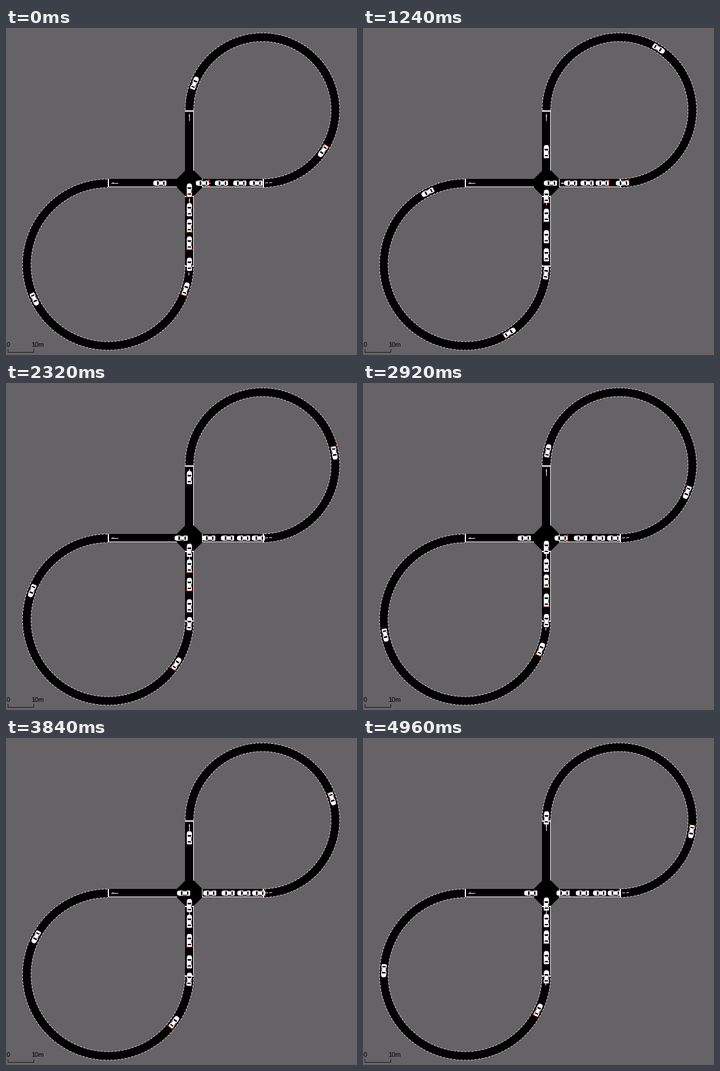
A matplotlib script that plays this animation: 600x559 px, repeating every 5 s.

```python
import numpy as np
import matplotlib.pyplot as plt
from matplotlib.animation import FuncAnimation
from matplotlib.collections import PolyCollection

W, H, DPI = 600, 559, 80
PX = 72 / DPI                      # one pixel in points
FRAMES, STEP = 125, 40
ROAD = 7.3                         # half width of the lane

# Figure-eight track: up, big clockwise turn, left, big counter-clockwise turn
UP_C, UP_R = (438.25, 140.5), 124.75
LOW_C, LOW_R = (174.5, 404.5), 139.0
X0, Y0 = 313.5, 265.2
S_UP = LOW_C[1] - UP_C[1]
S_LEFT = S_UP + 1.5 * np.pi * UP_R
S_LOW = S_LEFT + UP_C[0] - LOW_C[0]
LENGTH = S_LOW + 1.5 * np.pi * LOW_R

# Every car repeats the motion of the one ahead, one slot of time later
CARS = 14
BRAKE = 40                         # deceleration that switches the lights on
# Slots passed over time (ms); the traffic slows down slightly
CLOCK = ([0, 760, 1720, 2320, 2920, 3840, 4960],
         [0, 1.56, 3.504, 4.756, 5.925, 7.72, 9.852])


def lower_queue(u):
    return 2 + 31.7 * u + 3.5 * np.sin(2 * np.pi * (u - .85) / .8)


def upper_queue(u):
    t = u - 7
    return 865 + 26 * t + t * t + 2.3 * np.sin(2 * np.pi * (t - .25) / .85)


def drive(u, start, end, times, speeds):
    """Distance under a piecewise linear speed, fitted from start to end."""
    grid = np.linspace(times[0], times[-1], 1000)
    v = np.interp(grid, times, speeds)
    way = np.r_[0, np.cumsum((v[1:] + v[:-1]) / 2)]
    return start + (end - start) * np.interp(u, grid, way / way[-1])


slots = np.linspace(0, CARS, 2801)
out, back, away = 4, 6.9, 10.3     # leaves a queue, joins the next, leaves it
places = np.select(
    [slots < out, slots < back, slots < away],
    [lower_queue(slots),
     drive(slots, lower_queue(out), upper_queue(back),
           [out, 5, 5.38, 5.7, 6.72, back], [55, 315, 470, 470, 20, 15]),
     upper_queue(slots)],
    drive(slots, upper_queue(away), LENGTH + lower_queue(0),
          [away, 11.15, 11.55, 12.4, 12.7, 13.25, CARS],
          [12, 215, 455, 465, 210, 35, 30]))
thrust = np.gradient(np.gradient(places, slots), slots)


def pose(s):
    """Position and heading at distance s along the track."""
    s %= LENGTH
    if s < S_UP:
        return (X0, LOW_C[1] - s), (0, -1)
    if s < S_LEFT:
        a = (s - S_UP) / UP_R
        c, n = np.cos(a), np.sin(a)
        return (UP_C[0] - UP_R * c, UP_C[1] - UP_R * n), (n, -c)
    if s < S_LOW:
        return (UP_C[0] - (s - S_LEFT), Y0), (-1, 0)
    a = (s - S_LOW) / LOW_R
    c, n = np.cos(a), np.sin(a)
    return (LOW_C[0] - LOW_R * n, LOW_C[1] - LOW_R * c), (-c, n)


def mirrored(half):
    return np.array(half + [(x, -y) for x, y in reversed(half)])


def box(x0, x1, y0, y1):
    return np.array([(x0, y0), (x1, y0), (x1, y1), (x0, y1)])


# Car parts, x pointing forward
BODY = [mirrored([(-11.2, 3.2), (-10.4, 4.4), (6, 4.5), (9.6, 3.9), (11.2, 2.2)])]
GLASS = [mirrored([(2, 2.7), (4.7, 3.5)]),
         mirrored([(-7.9, 3.2), (-5.8, 2.6)]),
         box(-5, 1.2, 3.2, 4), box(-5, 1.2, -4, -3.2)]
LIGHTS = [box(-12, -9.6, 3.2, 5.8), box(-12, -9.6, -5.8, -3.2)]


def placed(parts, at, heading):
    hx, hy = heading
    turn = np.array([[hx, hy], [-hy, hx]])
    return [p @ turn + at for p in parts]


fig = plt.figure(figsize=(W / DPI, H / DPI), dpi=DPI, facecolor="#656365")
ax = fig.add_axes([0, 0, 1, 1])
ax.set_xlim(0, W)
ax.set_ylim(H, 0)
ax.axis("off")


def line(x, y, width=1, color="white", z=3, **kw):
    ax.plot(x, y, color=color, lw=width * PX, zorder=z, snap=False,
            solid_capstyle="butt", dash_capstyle="butt", **kw)


def shape(points, color="black", z=1):
    ax.fill(*np.array(points).T, color=color, lw=0, zorder=z)


def arc_road(center, radius, start):
    a = np.radians(np.linspace(start, start + 270, 300))
    ring = np.c_[np.cos(a), np.sin(a)]
    inner, outer = [center + r * ring for r in (radius - ROAD, radius + ROAD)]
    shape(np.r_[inner, outer[::-1]])
    for rim in (inner, outer):
        line(*rim.T, .8, z=2, dashes=(5, 2.5))


def arrow(tip, heading):
    parts = [box(-12, 0, -.5, .5), np.array([(0, 0), (-4, 1.2), (-4, -1.2)])]
    for part in placed(parts, tip, heading):
        shape(part, "white", 3)


arc_road(UP_C, UP_R, 180)
arc_road(LOW_C, LOW_R, 0)

# Straight roads with a border on their right and lower sides
top, bottom = UP_C[1], LOW_C[1]
left, right = LOW_C[0], UP_C[0]
shape(box(306, 321, top, bottom))
shape(box(left, right, 258, 272))
line([320.5, 320.5], [top, bottom], z=2)
line([left, right], [271.5, 271.5], z=2)

reach, flat = 21.5, 7.5
corners = [(flat, reach), (reach, flat), (reach, -flat), (flat, -reach)]
shape(np.array(corners + [(-x, -y) for x, y in corners]) + (X0 + .3, Y0), z=2.5)

# Stop lines, lane arrows and connection marks
for y in (142, 288, 407):
    line([306, 321], [y, y], 2)
for x in (175, 440):
    line([x, x], [258, 272], 2)
line([335.5, 335.5], [258, 272])
for y in (147, 291):
    arrow((313.5, y), (0, -1))
for x in (180, 338):
    arrow((x, Y0), (-1, 0))
line([313, 312.5], [411, 424], dashes=(5, 2))
line([443, 456], [264.9, 264.2], dashes=(5, 2))

# Scale bar
line([3.5, 3.5, 47.5, 47.5], [549, 554.5, 554.5, 549], color="#161616")
for x, label in ((3.5, "0"), (54, "10m")):
    ax.text(x, 545, label, ha="center", va="baseline", color="black",
            family="Liberation Sans", fontsize=11 * PX)

bodies, glass, lights = [
    ax.add_collection(PolyCollection([], facecolors=c, edgecolors="none", zorder=z))
    for c, z in (("white", 5), ("black", 6), ("#f01810", 5.5))]


def draw(i):
    phase = np.interp(i * STEP, *CLOCK)
    white, dark, red = [], [], []
    for u in (np.arange(CARS) + phase) % CARS:
        at, heading = pose(np.interp(u, slots, places))
        white += placed(BODY, at, heading)
        dark += placed(GLASS, at, heading)
        if np.interp(u, slots, thrust) < -BRAKE:
            red += placed(LIGHTS, at, heading)
    bodies.set_verts(white)
    glass.set_verts(dark)
    lights.set_verts(red)
    return bodies, glass, lights


anim = FuncAnimation(fig, draw, frames=FRAMES, interval=STEP,
                     init_func=lambda: draw(0), repeat=True, repeat_delay=0)
plt.show()
```
